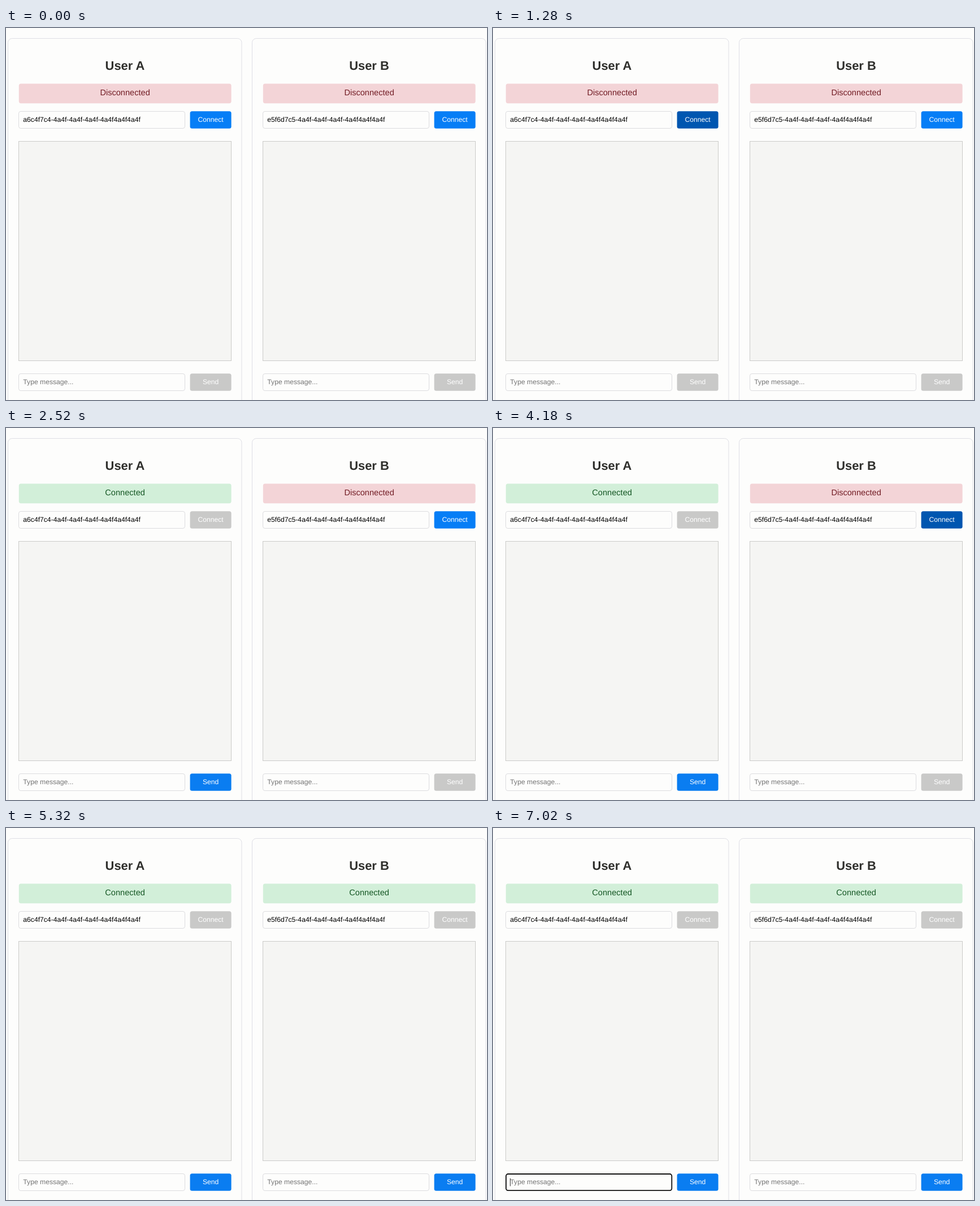
An HTML page for the animation above (8000 ms loop, 851 by 658 pixels).

```html
<!DOCTYPE html>
<html lang="en">
<head>
<meta charset="utf-8">
<title>Two-user chat</title>
<style>
  html, body { margin: 0; width: 100%; height: 100%; overflow: hidden; background: #fdfdfc; }
  svg { display: block; }
  text {
    font: 12.17px "Liberation Sans", Arial, sans-serif;
    text-rendering: geometricPrecision;
  }
  .mid { text-anchor: middle; }
  .title { font-size: 21.9px; font-weight: bold; fill: #2f2f2c; }
  .status { font-size: 14.6px; }
  .label { fill: #fff; }
  .hint { fill: #757575; }
  .panel { fill: none; stroke: #dfdfe5; }
  .field { fill: #fdfdfc; stroke: #dcdcdf; }
  .log { fill: #f5f5f3; stroke: #cbcbc9; }
  .offline rect { fill: #f3d4d7; }
  .offline text { fill: #721c24; }
  .online rect { fill: #d2efd9; }
  .online text { fill: #155724; }
  .focus rect { fill: none; stroke: #101010; stroke-width: 1.8; }
  .focus path { stroke: #333; }

  .connect, .send, .online, .offline, .focus { animation: 8s step-end infinite; }
  .a .connect { animation-name: connect-a; }
  .b .connect { animation-name: connect-b; }
  .a .send { animation-name: send-a; }
  .b .send { animation-name: send-b; }
  .a .online { animation-name: show-a; }
  .b .online { animation-name: show-b; }
  .a .offline { animation-name: hide-a; }
  .b .offline { animation-name: hide-b; }
  .focus { animation-name: focus; }

  @keyframes connect-a { 0% { fill: #067ef6; } 16% { fill: #0056b0; } 29.5%, 100% { fill: #c9c9c8; } }
  @keyframes connect-b { 0% { fill: #067ef6; } 52.25% { fill: #0056b0; } 56.25%, 100% { fill: #c9c9c8; } }
  @keyframes send-a { 0% { fill: #c9c9c8; } 29.5%, 100% { fill: #0a7df1; } }
  @keyframes send-b { 0% { fill: #c9c9c8; } 56.25%, 100% { fill: #0a7df1; } }
  @keyframes show-a { 0% { opacity: 0; } 29.5%, 100% { opacity: 1; } }
  @keyframes show-b { 0% { opacity: 0; } 56.25%, 100% { opacity: 1; } }
  @keyframes hide-a { 0% { opacity: 1; } 29.5%, 100% { opacity: 0; } }
  @keyframes hide-b { 0% { opacity: 1; } 56.25%, 100% { opacity: 0; } }
  @keyframes focus { 0% { opacity: 0; } 82%, 100% { opacity: 1; } }
</style>
</head>
<body>
<svg id="stage" width="851" height="658" viewBox="0 0 851 658"></svg>
<script>
  const box = (cls, x, y, w, h, r = 3.6) =>
    `<rect class="${cls}" x="${x}" y="${y}" width="${w}" height="${h}" rx="${r}"/>`;
  const text = (cls, x, y, str) => `<text class="${cls}" x="${x}" y="${y}">${str}</text>`;

  const status = (cls, str) =>
    `<g class="${cls}">${box('', 22.8, 98.4, 375.8, 34.8)}${text('status mid', 210.6, 119.1, str)}</g>`;

  // An input field with the button to its right
  const row = (y, cls, str, action, label) =>
    box('field', 22.5, y + .5, 294, 30) + text(cls, 30.3, y + 19, str) +
    box(action, 325.6, y + .2, 73, 30.6) + text('label mid', 362.1, y + 19, label);

  const focusRing = `<g class="focus">${box('', 23.1, 612, 293.2, 29.2)}<path d="M30.5 619.5v14"/></g>`;

  const panel = (id, x, name, key) => `
    <g class="${id}" transform="translate(${x})">
      ${box('panel', 3.5, 18.5, 413.5, 660, 7.3)}
      ${text('title mid', 210.5, 74, name)}
      ${status('offline', 'Disconnected')}
      ${status('online', 'Connected')}
      ${row(147, '', key, 'connect', 'Connect')}
      ${box('log', 22.5, 200.5, 376, 388, 0)}
      ${row(611, 'hint', 'Type message...', 'send', 'Send')}
      ${id === 'a' ? focusRing : ''}
    </g>`;

  document.getElementById('stage').innerHTML =
    panel('a', 0, 'User A', 'a6c4f7c4-4a4f-4a4f-4a4f-4a4f4a4f4a4f') +
    panel('b', 432, 'User B', 'e5f6d7c5-4a4f-4a4f-4a4f-4a4f4a4f4a4f');
</script>
</body>
</html>
```
